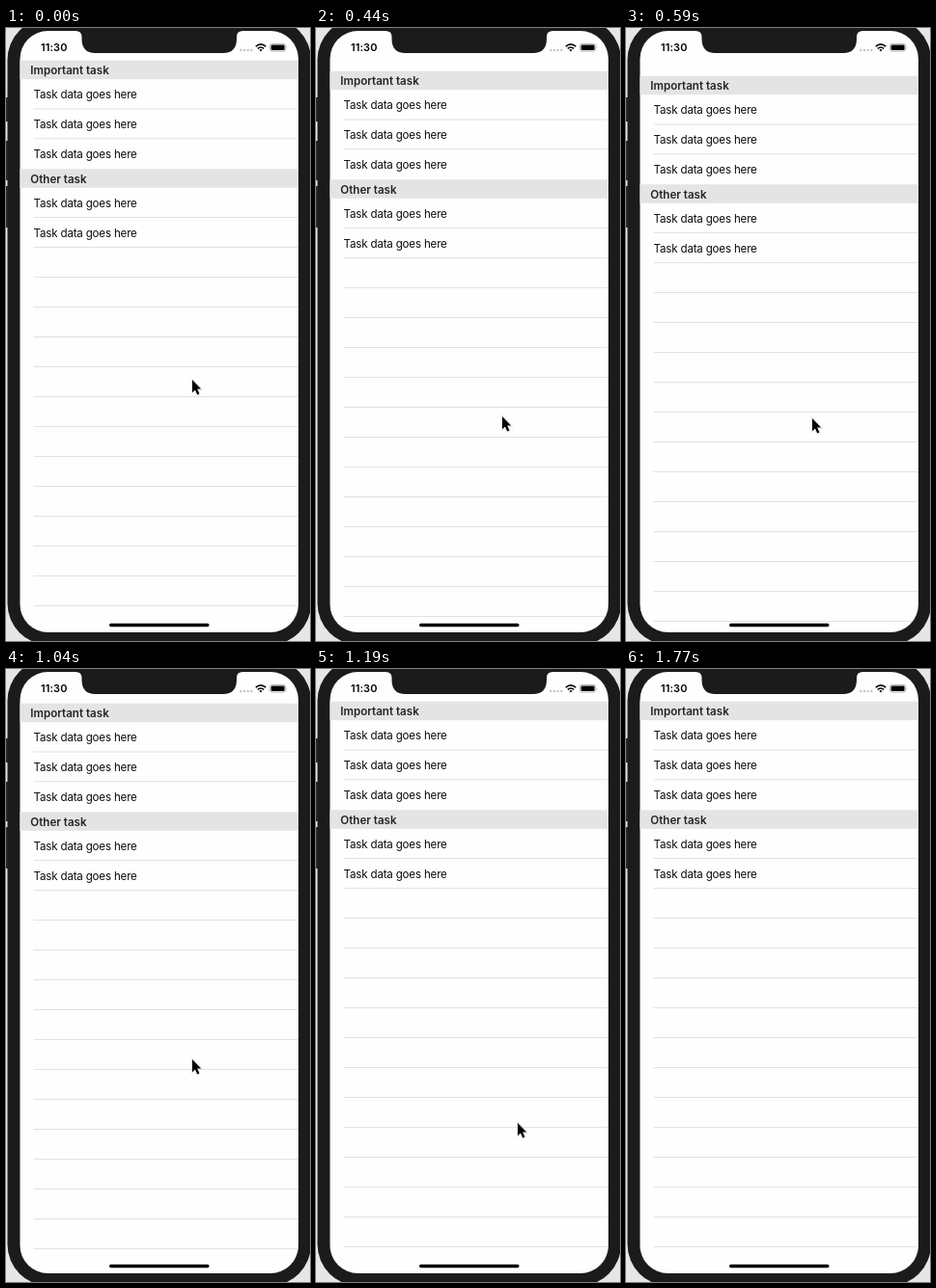
Animation of 315x636 px, one loop 2.07 s. Source, as an HTML page:

```html
<!DOCTYPE html>
<html lang="en">
<head>
<meta charset="utf-8">
<title>Task list pull</title>
<style>
  html, body { margin: 0; width: 100%; height: 100%; overflow: hidden; background: #e6e6e6; }
  svg { display: block; width: 315px; height: 636px; }
  text { font-family: Inter, "Liberation Sans", sans-serif; white-space: pre; }
  .task { font-size: 11.6px; letter-spacing: -.2px; fill: #0c0c0c; }
  .heading { font-size: 11.6px; font-weight: 600; fill: #242426; }
  .clock { font-size: 11px; font-weight: 600; letter-spacing: .1px; }
  #cursor { filter: drop-shadow(0 .6px .6px rgba(0, 0, 0, .4)); }
</style>
</head>
<body>
<svg viewBox="0 0 315 636">
  <clipPath id="screen"><rect x="14.5" y="3" width="288.5" height="624" rx="29"/></clipPath>

  <!-- Phone body and side buttons -->
  <path d="M0 72h3v25H0zM0 117h3v41H0zM0 164h3v43H0z" fill="#2b2b2b"/>
  <rect x="1.5" y="-10" width="314.5" height="650" rx="43" fill="#1b1b1b"/>

  <g clip-path="url(#screen)">
    <rect width="315" height="636" fill="#fefefe"/>
    <g id="list"></g>
    <path d="M72 2V3q6.500 0 6.500 6v2q0 15 14 15H225q14 0 14-15V9q0-6 6.500-6V2z" fill="#1b1b1b"/>
  </g>

  <!-- Status bar -->
  <text class="clock" x="36" y="24">11:30</text>
  <g fill="#c4c4c4">
    <circle cx="243.300" cy="23" r="1.200"/><circle cx="247" cy="23" r="1.200"/>
    <circle cx="250.700" cy="23" r="1.200"/><circle cx="254.300" cy="23" r="1.200"/>
  </g>
  <g fill="none" stroke="#000" stroke-width="1.600">
    <path d="M258.800 19.200q5.200-4.600 10.400 0M260.800 21.400q3.200-2.800 6.400 0"/>
    <path d="M262.400 22.600q1.600-1.200 3.200 0L264 24.400z" fill="#000" stroke="none"/>
  </g>
  <rect x="273.400" y="16.400" width="16.400" height="7.800" rx="2.200" fill="none" stroke="#a2a6a2" stroke-width=".8"/>
  <rect x="274.600" y="17.600" width="14" height="5.400" rx="1.200"/>
  <path d="M290.600 18.900q1.300 1.400 0 2.800z" fill="#a2a6a2"/>

  <rect x="107" y="617.800" width="103.500" height="3.500" rx="1.750"/>

  <path id="cursor" d="M0 0V13.200L3 10.400 5.200 15.500 7.400 14.600 5.200 9.600H9.200Z"
        stroke="#fff" stroke-width="1.600" paint-order="stroke"/>
</svg>
<script>
const LOOP = 2070;
const ROW = 31;
const list = document.getElementById('list');
const cursor = document.getElementById('cursor');

// [start time, value] pairs, each held until the next one
const pulls = [[0, 0], [440, 11], [590, 16], [890, 6], [1040, 2], [1190, 0]];
const pointer = [
  [0, [193, 365]], [300, [193, 366]], [440, [193, 403]], [590, [193, 405]],
  [1190, [209, 471]], [1330, [240.5, 590]], [1480, [253.5, 615.5]],
  [1630, [264.5, 635]], [1770, [264.5, 660]]
];

const label = (kind, x, y, words) => `<text class="${kind}" x="${x}" y="${y}">${words}</text>`;
const divider = y => `<rect x="28.500" y="${y}" width="275" height="1" fill="#e2e2e2"/>`;

function section(top, title, count) {
  let markup = `<rect x="14" y="${top}" width="290" height="19.500" fill="#e4e4e4"/>`
    + label('heading', 25.3, top + 14.3, title);
  for (let i = 0; i < count; i++)
    markup += label('task', 28.6, top + 39.5 + i * ROW, 'Task data goes here');
  return markup;
}

let markup = divider(83.5) + divider(114.2);
for (let i = 0; i < 14; i++) markup += divider(196 + i * ROW);
list.innerHTML = markup + section(33.7, 'Important task', 3) + section(146.3, 'Other task', 2);

const held = (steps, time) => steps.findLast(([start]) => start <= time)[1];

function draw() {
  const time = performance.now() % LOOP;
  list.setAttribute('transform', `translate(0 ${held(pulls, time)})`);
  cursor.setAttribute('transform', `translate(${held(pointer, time)})`);
  requestAnimationFrame(draw);
}
draw();
</script>
</body>
</html>
```
